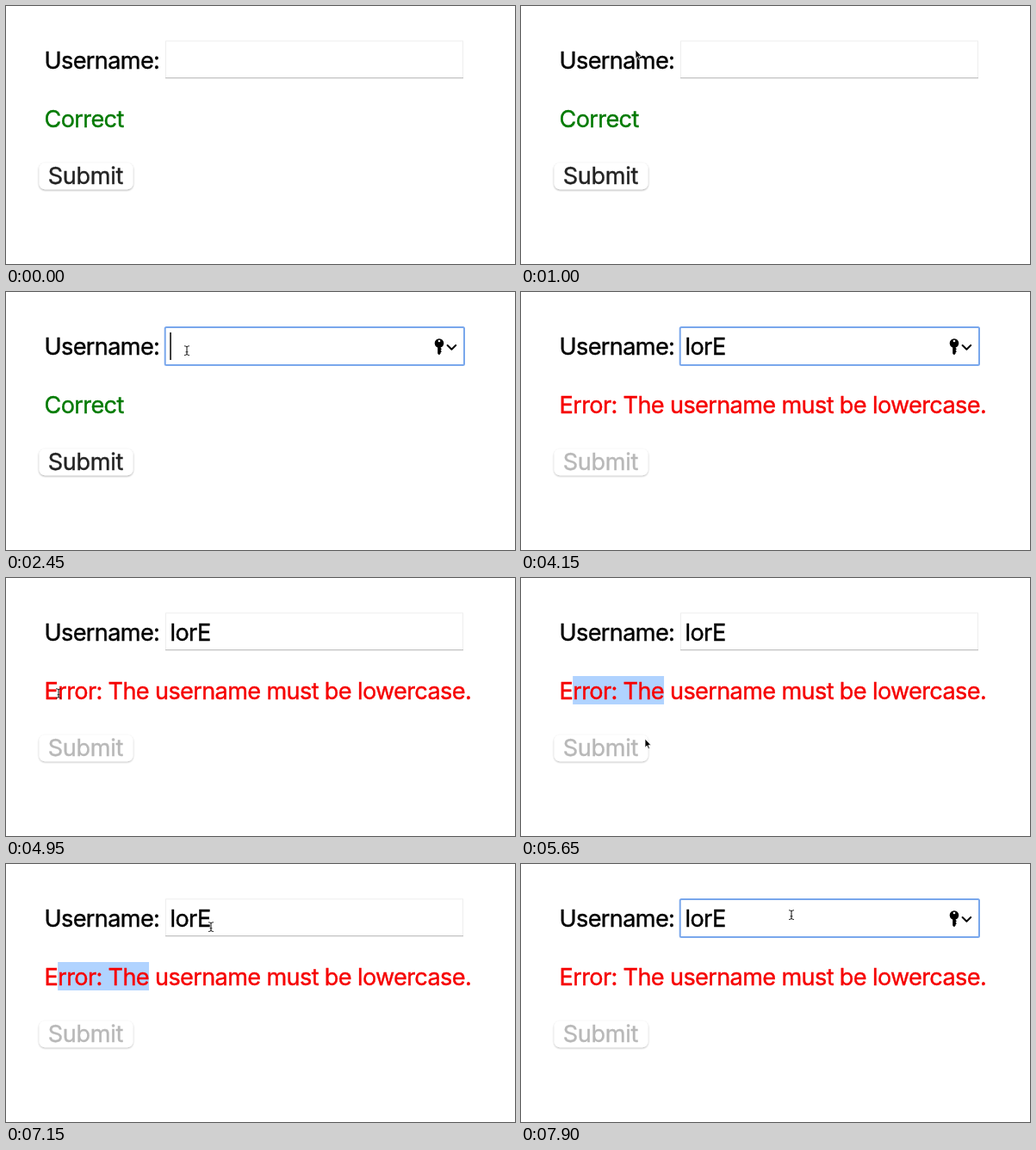
These frames come from a looping animation (591x300 px, 8000 ms). An HTML page:

```html
<!DOCTYPE html>
<html lang="en">
<head>
<meta charset="utf-8">
<title>Username form</title>
<style>
  html, body { margin: 0; width: 100%; height: 100%; overflow: hidden; background: #fff; }
  svg { display: block; width: 100%; height: 100%; }
  text {
    font: 27.1px Inter, "Open Sans", sans-serif; letter-spacing: -0.63px; white-space: pre;
    fill: currentColor; stroke: currentColor; stroke-width: .4px;
  }
  #submit text { letter-spacing: -0.3px; }
</style>
</head>
<body>
<svg viewBox="0 0 591 300">
  <defs>
    <filter id="shadow" x="-10%" y="-20%" width="120%" height="150%">
      <feDropShadow dx="0" dy="1" stdDeviation="1" flood-color="#000" flood-opacity=".36"/>
    </filter>
  </defs>

  <text x="44.5" y="73.2">Username:</text>

  <g id="plain">
    <rect x="185.5" y="40.8" width="345" height="43" fill="#fff" stroke="#eee"/>
    <path d="M185 83.6H531" stroke="#c4c4c4" stroke-width="1.2"/>
  </g>
  <g id="focused">
    <rect x="184.7" y="41.1" width="347.3" height="43.8" rx="1.5" fill="#fff" stroke="#79a7ec" stroke-width="2"/>
    <circle cx="503" cy="59.6" r="5.3"/>
    <circle cx="503" cy="57" r="1.3" fill="#fff"/>
    <path d="M501.2 63h3.4v2l1.3 1.3-1.3 1.4 1.3 1.4-1.3 1.3v1l-1.7 1.9-1.7-1.9z"/>
    <path d="M512.6 62l4.8 4.7 4.8-4.7" fill="none" stroke="#000" stroke-width="2"
      stroke-linecap="round" stroke-linejoin="round"/>
  </g>
  <text id="value" x="190.5" y="73.2"></text>
  <rect id="caret" y="47" width="1.5" height="32"/>

  <rect id="selection" y="114" height="33" fill="#b0d3ff"/>
  <text id="message" x="44.5" y="141.3"></text>

  <g id="submit">
    <rect id="button" x="38.5" y="182.3" width="109" height="31" rx="7" fill="#fff" filter="url(#shadow)"/>
    <text id="label" x="48.7" y="207.3">Submit</text>
  </g>

  <path id="arrow" d="M0 0V10.2L2.3 8.1 3.9 11.8 5.4 11.1 3.9 7.4H7Z"
    stroke="#fff" stroke-width=".8"/>
  <path id="beam" d="M-3 -5.3Q-.4 -5.3 0 -4Q.4 -5.3 3 -5.3M0 -4V4.4M-3 5.5Q-.4 5.5 0 4.2Q.4 5.5 3 5.5M-1.4 1.8H1.4"
    fill="none" stroke="#222" stroke-width="1.1"/>
</svg>
<script>
const LOOP = 8000, STEP = 50, BLINK = 500;
const WORD = "lorE", KEY_TIMES = [2600, 2950, 3050, 3200];
const CLICK = 1700, BLUR = 4950, DRAG_END = 5350, REFOCUS = 7200;
const SELECT_FROM = 1, SELECT_TO = 9;
const BLINK_STARTS = [1450, ...KEY_TIMES, REFOCUS];

// Pointer key points: time, x, y
const STOPS = [
  [450, 262, 294], [800, 62, 100], [1000, 133, 51], [1400, 116, 53], [1900, 210, 68],
  [4150, 210, 68], [BLUR, 61, 134], [DRAG_END, 167, 134], [5650, 144, 187],
  [6100, 82, 196], [6600, 494, 172], [7150, 238, 73], [7500, 314, 59], [LOOP, 314, 59]
];

const $ = id => document.getElementById(id);
const show = (id, on) => $(id).setAttribute("display", on ? "inline" : "none");
const within = (v, a, b) => v >= a && v < b;
const ease = u => u * u * (3 - 2 * u);
const progress = (t, a, b) => ease(Math.max(0, Math.min(1, (t - a) / (b - a))));

function pointerAt(t) {
  const i = STOPS.findIndex(s => s[0] > t);
  const [t0, x0, y0] = STOPS[i - 1], [t1, x1, y1] = STOPS[i];
  const k = progress(t, t0, t1);
  return [x0 + (x1 - x0) * k, y0 + (y1 - y0) * k];
}

function drawPointer(t) {
  const visible = t >= STOPS[0][0] && !within(t, KEY_TIMES[0], 4200);
  const [x, y] = visible ? pointerAt(t) : [0, 0];
  const overInput = within(x, 185, 531) && within(y, 41, 84);
  const overText = within(x, 44, 540) && within(y, 114, 147) && t > CLICK;
  const beam = overInput || overText;
  show("beam", visible && beam);
  show("arrow", visible && !beam);
  $(beam ? "beam" : "arrow").setAttribute("transform", `translate(${x} ${y})`);
}

function drawInput(t, typed) {
  const focus = within(t, CLICK, BLUR) || t >= REFOCUS;
  show("plain", !focus);
  show("focused", focus);
  $("value").textContent = WORD.slice(0, typed);

  const blinkStart = Math.max(...BLINK_STARTS.filter(s => s <= t));
  show("caret", focus && (t - blinkStart) % (2 * BLINK) < BLINK);
  $("caret").setAttribute("x", 190.3 + $("value").getComputedTextLength());
}

function drawStatus(invalid) {
  $("message").textContent = invalid ? "Error: The username must be lowercase." : "Correct";
  $("message").style.color = invalid ? "#f60000" : "#007a00";
  $("label").style.color = invalid ? "#b8b8b8" : "#222";
  $("button").style.opacity = invalid ? .8 : 1;
}

function drawSelection(t) {
  const dragging = within(t, BLUR + STEP, REFOCUS);
  show("selection", dragging);
  if (!dragging) return;
  const last = SELECT_FROM + Math.round(progress(t, BLUR, DRAG_END) * (SELECT_TO - SELECT_FROM));
  const left = $("message").getStartPositionOfChar(SELECT_FROM).x;
  const right = $("message").getEndPositionOfChar(last).x;
  $("selection").setAttribute("x", left);
  $("selection").setAttribute("width", right - left);
}

function draw(t) {
  const typed = KEY_TIMES.filter(k => k <= t).length;
  drawInput(t, typed);
  drawStatus(typed === WORD.length);
  drawSelection(t);
  drawPointer(t);
}

const start = performance.now();
function frame() {
  const t = (performance.now() - start) % LOOP;
  draw(Math.floor(t / STEP) * STEP);
  requestAnimationFrame(frame);
}
frame();
</script>
</body>
</html>
```
